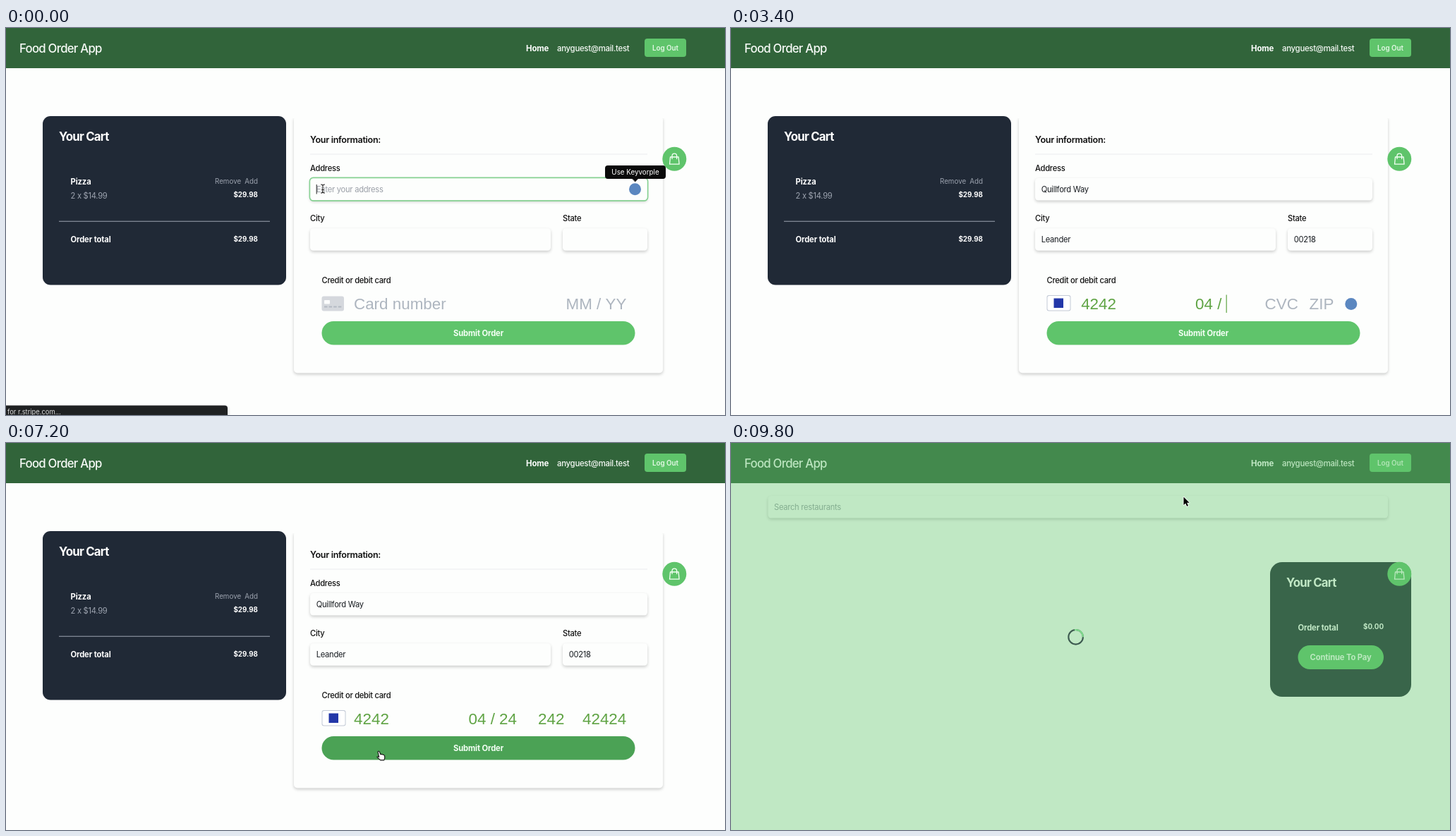
Write an HTML page with a canvas that moves like this. It is 1019 px wide and 549 px high and loops after 10 s.

```html
<!DOCTYPE html>
<html lang="en">
<head>
<meta charset="utf-8">
<title>Food Order App</title>
<style>
  html, body { margin: 0; width: 100%; height: 100%; overflow: hidden; background: #fdfefd; }
  canvas { display: block; }
</style>
</head>
<body>
<canvas id="stage" width="1019" height="549"></canvas>
<script>
const ctx = document.getElementById('stage').getContext('2d');
const LOOP = 10000, STEP = 200;
const GREEN = '#5fc46b', DARK_GREEN = '#4ba255', NAVY = '#202936', TYPED = '#60a445', FAINT = '#adb5bf';
const ADDRESS = 'Quillford Way', CITY = 'Leander', STATE = '00218';

const clamp = (v, lo = 0, hi = 1) => Math.min(hi, Math.max(lo, v));
const mix = (a, b, p) => a + (b - a) * p;
const typed = (text, t, start, end) =>
  text.slice(0, Math.round(text.length * clamp((t - start) / (end - start))));

function box(x, y, right, bottom, radius, fill, shadow) {
  ctx.save();
  if (shadow) {
    ctx.shadowColor = `rgba(0,0,0,${shadow})`;
    ctx.shadowBlur = 4;
    ctx.shadowOffsetY = 2;
  }
  ctx.fillStyle = fill;
  ctx.beginPath();
  ctx.roundRect(x, y, right - x, bottom - y, radius);
  ctx.fill();
  ctx.restore();
}

function disc(x, y, r, fill) {
  ctx.fillStyle = fill;
  ctx.beginPath();
  ctx.arc(x, y, r, 0, 2 * Math.PI);
  ctx.fill();
}

function outline(d, color, width, fill) {
  const path = new Path2D(d);
  if (fill) { ctx.fillStyle = fill; ctx.fill(path); }
  ctx.strokeStyle = color;
  ctx.lineWidth = width;
  ctx.lineJoin = ctx.lineCap = 'round';
  ctx.stroke(path);
}

// y is the middle of the capitals; returns the width of the text
function text(str, x, y, color, size = 11.2, weight = 400, align = 'left', family = 'Inter') {
  const tracking = family !== 'Inter' || size < 10.5 ? 0 : size > 15 ? -0.045 : weight > 600 ? -0.01 : -0.025;
  ctx.font = `${weight} ${size}px "${family}", sans-serif`;
  ctx.letterSpacing = `${tracking * size}px`;
  ctx.textAlign = align;
  ctx.fillStyle = color;
  ctx.fillText(str, x, y + size * 0.364);
  return ctx.measureText(str).width;
}

const cardText = (str, x, color) => text(str, x, 391, color, 22.4, 400, 'left', 'Liberation Sans');
const managerIcon = (x, y) => disc(x, y, 8.5, '#5b87c0');

function header() {
  box(0, 0, 1019, 57, 0, '#31643a');
  text('Food Order App', 19, 28.5, '#f6faf6', 16.8, 500);
  text('Home', 737, 28.5, '#fff', 11.4, 700);
  text('anyguest@mail.test', 781, 28.5, '#f6faf6', 11.4, 500);
  box(905, 15, 964, 41, 4, GREEN);
  text('Log Out', 934.5, 28, '#e4f8e6', 9.8, 600, 'center');
}

function bagButton() {
  disc(947.3, 185.8, 17, GREEN);
  outline('M941.5 183h11.6l1 10.2h-13.6zM944 185.5v-4a3.3 3.3 0 0 1 6.6 0v4', '#f4fff5', 1.3);
}

function cart() {
  box(52, 125, 397, 364.5, 11, NAVY);
  text('Your Cart', 75, 154, '#fff', 16.8, 700);
  text('Pizza', 91.5, 218, '#fff', 11.2, 700);
  text('2 x $14.99', 91.5, 238, '#9ca3af');
  text('Remove', 296, 217, '#9ca3af', 9.8);
  text('Add', 357, 217, '#9ca3af', 9.8, 400, 'right');
  text('$29.98', 357, 236.5, '#fff', 9.8, 700, 'right');
  box(75, 273.8, 374, 274.7, 0, '#9ca3af');
  text('Order total', 91.5, 300, '#fff', 11.2, 700);
  text('$29.98', 357, 299, '#fff', 9.8, 700, 'right');
}

function field(x, right, y, value, focused, caret, placeholder = '') {
  const bottom = y + 31.5;
  box(x, y, right, bottom, 4.5, '#fdfefd', 0.2);
  if (focused) {
    ctx.strokeStyle = '#86d292';
    ctx.lineWidth = 1.6;
    ctx.beginPath();
    ctx.roundRect(x - 0.6, y - 0.6, right - x + 1.2, 32.7, 5);
    ctx.stroke();
    managerIcon(right - 17.5, y + 15.7);
  }
  const width = text(value || placeholder, x + 8.7, y + 16, value ? '#161a1f' : '#9a9fa7');
  if (caret) {
    const cx = x + 8.7 + (value ? width : 0);
    box(cx, y + 9, cx + 1, bottom - 9, 0, '#222');
  }
}

function cardIcon(branded) {
  if (branded) {
    box(447.5, 379, 481.5, 401.5, 3, '#c3cad6');
    box(448.5, 380, 480.5, 400.5, 2.5, '#fff');
    box(457.5, 383.5, 471, 397, 0, '#2337a8');
    return;
  }
  box(447.5, 380.5, 479, 401.5, 3, '#d5d8dd');
  box(451, 386, 459, 391.5, 1, '#fbfcfc');
  for (let i = 0; i < 4; i++) box(451 + i * 6.6, 394.5, 455.5 + i * 6.6, 396.5, 0, '#b3b9c2');
}

function cardFields(t) {
  const slide = t < 3000 ? 1 : Math.exp(-(t - 3000) / 100);
  const shift = 138 * slide;
  const number = typed('4242 4242 4242 4242', t, 2000, 3000);
  const expiry = ['', '0', '04 / ', '04 / 2', '04 / 24'][clamp(Math.floor((t - 3000) / 200), 0, 4)];
  const cvc = typed('242', t, 3800, 4400);
  const zip = typed('42424', t, 4400, 5400);
  const inputs = [
    [number, 'Card number', 325 + 168 * slide],
    [expiry, 'MM / YY', 655.5 + shift],
    [cvc, 'CVC', 754 + shift],
    [zip, 'ZIP', 817 + shift]
  ];
  const active = t < 2000 || t >= 5600 ? -1 : t < 3200 ? 0 : t < 4000 ? 1 : t < 4600 ? 2 : 3;

  cardIcon(number);
  ctx.save();
  ctx.beginPath();
  ctx.rect(491, 374, 400, 36);
  ctx.clip();
  inputs.forEach(([value, hint, x], i) => {
    const width = cardText(value || hint, x, value ? TYPED : FAINT);
    const caretX = x + (value ? width : 0);
    if (i === active) box(caretX, 378.5, caretX + 1.2, 404, 0, TYPED);
  });
  ctx.restore();
  if (t >= 2000 && t < 7200) managerIcon(878.8, 391.5);
}

function form(t, hover) {
  box(408, 125, 931, 489.5, 5, '#fdfefd', 0.2);
  box(406, 120, 933, 128, 0, '#fdfefd');
  text('Your information:', 431, 158, '#111', 12.6, 600);
  box(431, 178.5, 909, 179.4, 0, '#eceeef');
  text('Address', 431, 199, '#111', 11.2, 500);
  text('City', 431, 270, '#111', 11.2, 500);
  text('State', 789, 270, '#111', 11.2, 500);
  field(431, 909, 213, typed(ADDRESS, t, 0, 800), t < 1000, t < 1000, 'Enter your address');
  field(431, 772, 284.3, typed(CITY, t, 800, 1200), t >= 1000 && t < 1400, t >= 1000 && t < 1400);
  field(789, 909, 284.3, typed(STATE, t, 1200, 1800), t >= 1400 && t < 2000, t >= 1400 && t < 1800);
  text('Credit or debit card', 447.5, 358, '#111', 11.2, 500);
  cardFields(t);
  box(447.5, 416, 891.5, 449.5, 16.75, hover ? DARK_GREEN : GREEN);
  text(t < 8000 ? 'Submit Order' : 'Submitting', 669.5, 433, '#f4fff5', 11.2, 700, 'center');
}

function tooltip() {
  box(849, 195, 935, 214, 4, '#0a0a0a');
  outline('M888 214h7.5l-3.7 4z', '#0a0a0a', 0.5, '#0a0a0a');
  text('Use Keyvorple', 892, 204.5, '#fff', 9.8, 400, 'center');
}

function statusBar() {
  box(-4, 535.5, 314, 553, 4, '#1f2122', 0.3);
  text('for r.stripe.com...', 2, 544.5, '#dcdcdc', 9.4);
}

function dialog(t) {
  box(316, -6, 667, 97.5, 4, '#292a2d', 0.5);
  text('localhost:3001 says', 329, 16, '#e8eaed', 12);
  text('Transaction Successful, continue your shopping', 329, 39.5, '#e8eaed', 10);
  box(604, 59, 654.5, 84.5, 3, t < 9000 ? '#8ab4f8' : '#8193c6');
  text('OK', 629, 72, '#292d3a', 9.8, 500, 'center');
}

function pointer(kind, x, y) {
  ctx.save();
  ctx.translate(x, y);
  if (kind === 'beam') {
    const d = 'M-2.5 -6q2.5 0 2.5 2v8q0 2 -2.5 2M2.5 -6q-2.5 0 -2.5 2v8q0 2 2.5 2M-1.5 1.5h3';
    outline(d, '#fff', 2.4);
    outline(d, '#222', 1.1);
  } else if (kind === 'hand') {
    outline('M0 1q1.5-1.5 2.4 .3l1.4 3.5q1.4-.8 2 .2 1.4-.6 2 .5 1.6-.2 1.8 1.4l.2 3-1 3h-5.2l-4.4-4q-.6-1.4 1-1.2l1.5 .7z', '#111', 1.1, '#fff');
  } else {
    const d = 'M0 0v11.5l2.7-2.5 1.9 4.3 1.9-.8-1.9-4.2h3.6z';
    outline(d, '#fff', 1.6, '#000');
    ctx.fill(new Path2D(d));
  }
  ctx.restore();
}

function mouseAt(t) {
  if (t < 2000) {
    const p = clamp(t / 1800);
    return ['beam', mix(449, 450, p), mix(228, 232, p)];
  }
  if (t < 6000) return null;
  if (t < 8600) {
    const p = clamp((t - 5800) / 1200), eased = p * p * (3 - 2 * p);
    const x = mix(450, 527, eased), y = mix(232, 437, eased);
    return [y > 416 ? 'hand' : 'arrow', x, y];
  }
  const p = clamp((t - 8400) / 600);
  return ['arrow', mix(527, 641.5, p), mix(437, 76.5, p)];
}

function restaurantsPage() {
  box(52.5, 75, 931, 106.5, 4.5, '#fdfefd', 0.2);
  text('Search restaurants', 61, 90.5, '#9a9fa7');
  box(764, 169, 964, 360, 17, NAVY);
  text('Your Cart', 787, 197.5, '#fff', 16.8, 700);
  text('Order total', 803.5, 262, '#fff', 11.2, 700);
  text('$0.00', 925, 260.5, '#fff', 9.8, 700, 'right');
  box(803.5, 287, 925, 321, 17, GREEN);
  text('Continue To Pay', 864, 304, '#f4fff5', 11.2, 700, 'center');
  bagButton();
  box(0, 0, 1019, 549, 0, 'rgba(96,196,106,.39)');
  [['#3d5a50', 0, 2], ['#7fdc8c', -0.55, 0]].forEach(([color, from, to]) => {
    ctx.strokeStyle = color;
    ctx.lineWidth = 2.1;
    ctx.lineCap = 'butt';
    ctx.beginPath();
    ctx.arc(488.6, 275.3, 10.3, from * Math.PI, to * Math.PI);
    ctx.stroke();
  });
}

function draw(t) {
  const mouse = mouseAt(t);
  box(0, 0, 1019, 549, 0, '#fdfefd');
  header();
  if (t >= 9800) {
    restaurantsPage();
  } else {
    cart();
    form(t, t >= 8000 || (mouse && mouse[0] === 'hand'));
    bagButton();
    if (t < 400) tooltip();
    if (t < 600) statusBar();
    if (t >= 8600) dialog(t);
  }
  if (mouse) pointer(...mouse);
}

function tick() {
  draw(Math.floor(performance.now() % LOOP / STEP) * STEP);
  requestAnimationFrame(tick);
}
tick();
</script>
</body>
</html>
```
